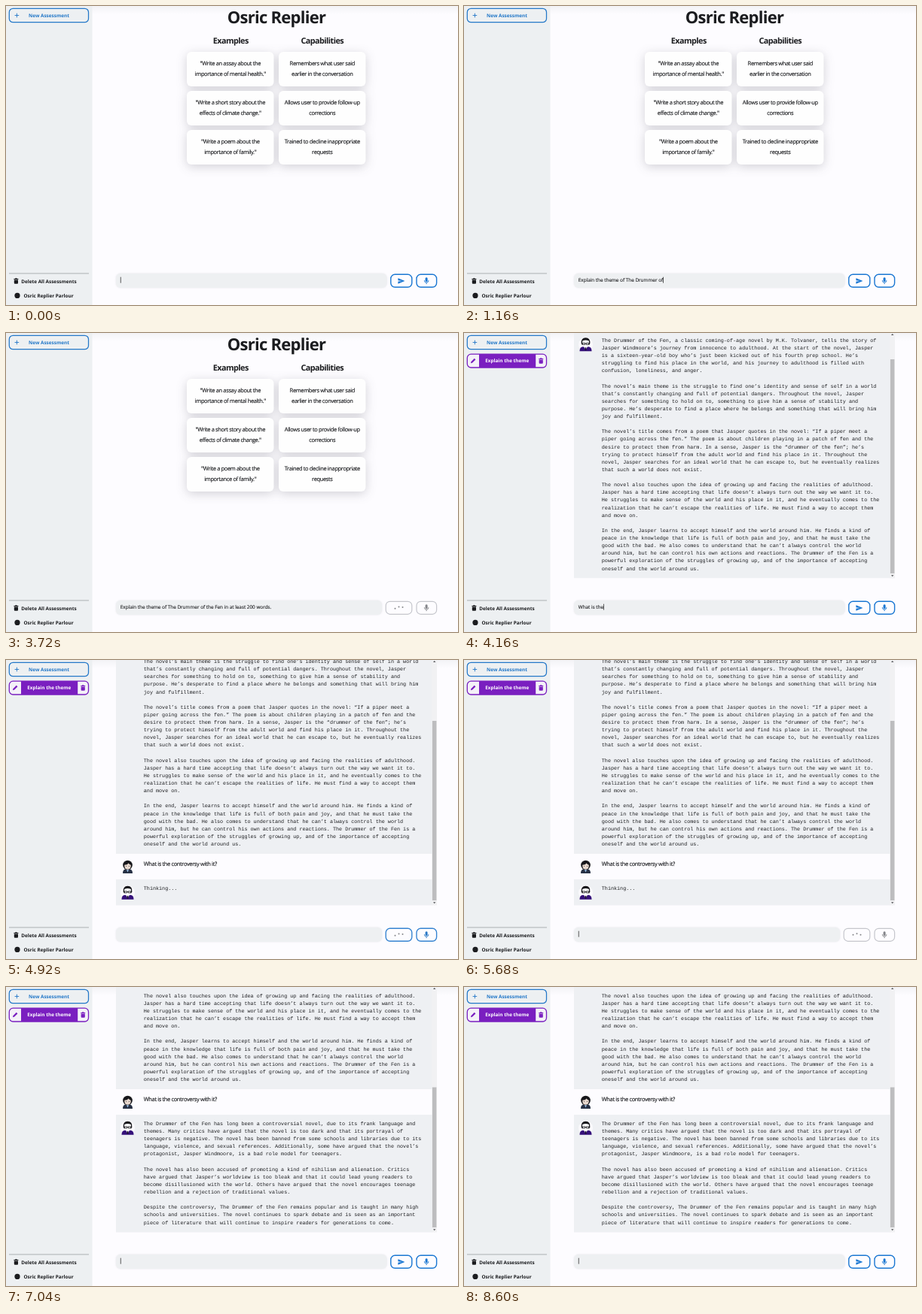
An HTML page that plays this animation: 600 px wide and 398 px high, repeating every 8.68 s.

```html
<!DOCTYPE html>
<html lang="en">
<head>
<meta charset="utf-8">
<title>Essay assistant</title>
<style>
  html, body { margin: 0; width: 100%; height: 100%; overflow: hidden; background: #fdfcff; }
  svg { display: block; width: 100vw; height: 100vh; }
  text { font-family: 'Open Sans', 'Noto Sans', sans-serif; fill: #1b1c1f; text-rendering: geometricPrecision; white-space: pre; }
  .mid { text-anchor: middle; }
  .title { font-size: 22px; font-weight: 700; letter-spacing: -.75px; }
  .head { font-size: 10.8px; font-weight: 700; letter-spacing: -.55px; }
  .body { font-size: 7.5px; letter-spacing: -.37px; stroke: #1b1c1f; stroke-width: .14px; }
  .side { font-size: 6.4px; font-weight: 700; }
  .typed { font-size: 6.37px; stroke: #1b1c1f; stroke-width: .12px; }
  .mono { font: 6.76px 'Liberation Mono', monospace; }
  #cards { fill: #fefefe; filter: drop-shadow(0 3px 7px rgba(40, 42, 55, .2)); }
  .blue { fill: none; stroke: #2478c8; stroke-width: 1.25; }
  .purple { fill: none; stroke: #7a1fc0; stroke-width: 1.3; }
  .row { fill: #eef0f3; }
</style>
</head>
<body>
<svg viewBox="0 0 600 398" preserveAspectRatio="none">
  <defs>
    <clipPath id="view"><rect x="146" width="420" height="326.5"/></clipPath>
    <linearGradient id="topShade" x2="0" y2="1">
      <stop stop-color="#f3f3f6"/>
      <stop offset="1" stop-color="#fdfcff"/>
    </linearGradient>
    <g id="bin">
      <path d="M-3-3.2h6v1.1h-6zM-1.2-4h2.4v1h-2.4zM-2.6-1.6h5.2V2.6q0 1-1 1h-3.2q-1 0-1-1z"/>
    </g>
    <g id="student">
      <path d="M-6.5 9q0-5.5 4-5.5h5q4 0 4 5.5z" fill="#263044"/>
      <path d="M-2 3h4L0 7.5z" fill="#9fc4ea"/>
      <circle cy="-2" r="6.3" fill="#17171b"/>
      <path d="M-4.2-2.2q4 0 5.4-2.3 1 2 3 2.3v1.6q-.5 4.4-4.2 4.4T-4.2-.6z" fill="#e9d9cf"/>
      <path d="M-2.4-.5h1M1.4-.5h1" stroke="#333" stroke-width=".8"/>
    </g>
    <g id="tutor">
      <circle r="9.5" fill="#fbfafd"/>
      <path d="M-8 9.3q0-6 4.5-6h7q4.5 0 4.5 6z" fill="#35107a"/>
      <path d="M-2.4 3h4.8L0 8z" fill="#fff"/>
      <path d="M-.7 4h1.4l.5 3.5L0 8.5l-1.2-1z" fill="#1b1230"/>
      <path d="M-5.8-1q-.6-7.8 5.8-7.8T5.8-1L4.6 1h-9.2z" fill="#17171b"/>
      <path d="M-4.4-4.6q4.4-2 8.8 0v4Q3.8 4.2 0 4.2T-4.4-.6z" fill="#fafafa"/>
      <path d="M-4-1.6h3.2v2H-4zM.8-1.6H4v2H.8zM-.8-.9h1.6" fill="none" stroke="#17171b" stroke-width=".8"/>
    </g>
  </defs>

  <rect width="600" height="398" fill="#fdfcff"/>
  <rect width="600" height="11" fill="url(#topShade)"/>

  <g id="welcome">
    <text class="mid title" x="359" y="23.3">Osric Replier</text>
    <text class="mid head" x="298.3" y="49.9">Examples</text>
    <text class="mid head" x="419.8" y="49.9">Capabilities</text>
    <g id="cards"></g>
  </g>

  <g id="chat">
    <g clip-path="url(#view)">
      <g id="thread">
        <rect class="row" x="146" y="-328.5" width="420" height="328.5"/>
        <use href="#tutor" x="161.5" y="-311.5"/>
        <g id="essay"></g>
        <use href="#student" x="161.5" y="17"/>
        <text class="body" x="182.8" y="16.4">What is the controversy with it?</text>
        <rect class="row" x="146" y="34" width="420" height="300"/>
        <use href="#tutor" x="161.5" y="51.5"/>
        <text id="thinking" class="mono" x="182.8" y="48">Thinking...</text>
        <g id="reply"></g>
      </g>
    </g>
    <rect x="565.5" width="6.5" height="326.5" fill="#f1f1f3"/>
    <rect id="thumb" x="565.9" width="5.5" fill="#bdbdbf"/>
    <path d="M567 3h3.4l-1.7-2zM567 322.2h3.4l-1.7 2z" fill="#55565a"/>
  </g>

  <rect width="114.5" height="398" fill="#edf0f2"/>
  <rect class="blue" x="4.3" y="3.3" width="105.2" height="18.4" rx="5"/>
  <path class="blue" d="M11.6 12.5h5.6M14.4 9.7v5.6" style="stroke-width:.9"/>
  <text class="mid side" x="57" y="14.8" style="fill:#2478c8">New Assessment</text>
  <g id="topic">
    <rect x="4.3" y="28.2" width="105.2" height="17.8" rx="5" fill="#f4f1f8"/>
    <rect x="20" y="28" width="75.2" height="18" fill="#7a1fc0"/>
    <rect class="purple" x="4.3" y="28.2" width="105.2" height="17.8" rx="5"/>
    <path d="M9 40.2l.4-2 4.4-4.4 1.6 1.6-4.4 4.4z" fill="#7a1fc0"/>
    <use href="#bin" x="102.2" y="37.2" fill="#7a1fc0"/>
    <text class="mid side" x="57.3" y="39.4" style="fill:#fff">Explain the theme</text>
  </g>
  <path d="M4 356h106" stroke="#8f9296" stroke-width=".7"/>
  <use href="#bin" x="13.4" y="366.2" fill="#1b1c1f"/>
  <text class="side" x="20.2" y="368.6">Delete All Assessments</text>
  <circle cx="15" cy="385.4" r="3.6" fill="#1b1c1f"/>
  <text class="side" x="23.5" y="387.8">Osric Replier Parlour</text>

  <rect id="field" x="146" y="356" height="19" rx="6" fill="#eef0f2" style="filter:drop-shadow(0 0 1px rgba(60,60,80,.12))"/>
  <text id="typed" class="typed" x="151.8" y="367.4"></text>
  <rect id="caret" y="360.7" width=".8" height="8" fill="#333"/>
  <rect id="sendBox" y="357.3" height="17" rx="5.5" fill="none"/>
  <rect id="micBox" x="545" y="357.3" width="26.6" height="17" rx="5.5" fill="none"/>
  <path id="plane" d="M520.4 362.3l9 3.7-9 3.7v-2.9l5.6-.8-5.6-.8z" fill="#1976d2"/>
  <g id="dots" fill="#85868a"></g>
  <g id="mic">
    <rect x="556.6" y="361.2" width="3" height="5.8" rx="1.5" stroke="none"/>
    <path d="M555.3 365.2q0 3 2.8 3t2.8-3M558.1 368.2v2" fill="none" stroke-width=".9"/>
  </g>
</svg>

<script>
const LOOP = 8680, KEY_MS = 32, FADE_MS = 130;
const FIRST = { text: 'Explain the theme of The Drummer of the Fen in at least 200 words.', type: 40, send: 2200, answer: 3760 };
const SECOND = { text: 'What is the controversy with it?', type: 3800, send: 4900, answer: 6120 };

const essayText = `The Drummer of the Fen, a classic coming-of-age novel by M.K. Tolvaner, tells the story of
Jasper Windmoore’s journey from innocence to adulthood. At the start of the novel, Jasper
is a sixteen-year-old boy who’s just been kicked out of his fourth prep school. He’s
struggling to find his place in the world, and his journey to adulthood is filled with
confusion, loneliness, and anger.

The novel’s main theme is the struggle to find one’s identity and sense of self in a world
that’s constantly changing and full of potential dangers. Throughout the novel, Jasper
searches for something to hold on to, something to give him a sense of stability and
purpose. He’s desperate to find a place where he belongs and something that will bring him
joy and fulfillment.

The novel’s title comes from a poem that Jasper quotes in the novel: “If a piper meet a
piper going across the fen.” The poem is about children playing in a patch of fen and the
desire to protect them from harm. In a sense, Jasper is the “drummer of the fen”; he’s
trying to protect himself from the adult world and find his place in it. Throughout the
novel, Jasper searches for an ideal world that he can escape to, but he eventually realizes
that such a world does not exist.

The novel also touches upon the idea of growing up and facing the realities of adulthood.
Jasper has a hard time accepting that life doesn’t always turn out the way we want it to.
He struggles to make sense of the world and his place in it, and he eventually comes to the
realization that he can’t escape the realities of life. He must find a way to accept them
and move on.

In the end, Jasper learns to accept himself and the world around him. He finds a kind of
peace in the knowledge that life is full of both pain and joy, and that he must take the
good with the bad. He also comes to understand that he can’t always control the world
around him, but he can control his own actions and reactions. The Drummer of the Fen is a
powerful exploration of the struggles of growing up, and of the importance of accepting
oneself and the world around us.`;

const replyText = `The Drummer of the Fen has long been a controversial novel, due to its frank language and
themes. Many critics have argued that the novel is too dark and that its portrayal of
teenagers is negative. The novel has been banned from some schools and libraries due to its
language, violence, and sexual references. Additionally, some have argued that the novel’s
protagonist, Jasper Windmoore, is a bad role model for teenagers.

The novel has also been accused of promoting a kind of nihilism and alienation. Critics
have argued that Jasper’s worldview is too bleak and that it could lead young readers to
become disillusioned with the world. Others have argued that the novel encourages teenage
rebellion and a rejection of traditional values.

Despite the controversy, The Drummer of the Fen remains popular and is taught in many high
schools and universities. The novel continues to spark debate and is seen as an important
piece of literature that will continue to inspire readers for generations to come.`;

const cards = [
  ['"Write an assay about the', 'importance of mental health."'],
  ['"Write a short story about the', 'effects of climate change."'],
  ['"Write a poem about the', 'importance of family."'],
  ['Remembers what user said', 'earlier in the conversation'],
  ['Allows user to provide follow-up', 'corrections'],
  ['Trained to decline inappropriate', 'requests'],
];

const $ = id => document.getElementById(id);
const show = (id, on) => { $(id).style.display = on ? '' : 'none'; };

function add(parent, tag, attrs, text = '') {
  const el = document.createElementNS('http://www.w3.org/2000/svg', tag);
  for (const key in attrs) el.setAttribute(key, attrs[key]);
  el.textContent = text;
  return parent.appendChild(el);
}

function addLines(id, text, firstBaseline) {
  text.split('\n').forEach((line, i) =>
    add($(id), 'text', { class: 'mono', x: 182.8, y: firstBaseline + i * 10.12 }, line));
}

cards.forEach((lines, i) => {
  const x = i < 3 ? 240 : 362, y = 61 + (i % 3) * 52;
  add($('cards'), 'rect', { x, y, width: 115.5, height: 46, rx: 6 });
  lines.forEach((line, j) =>
    add($('welcome'), 'text', { class: 'mid body', x: x + 57.8, y: y + 18.2 + j * 13.5 }, line));
});
addLines('essay', essayText, -314.6);
addLines('reply', replyText, 48);
const dots = [0, 1, 2].map(i => add($('dots'), 'circle', { cx: 516.5 + i * 5, r: 1 }));

const clamp = v => Math.min(1, Math.max(0, v));
const mix = (a, b, k) => `rgb(${a.map((v, i) => Math.round(v + (b[i] - v) * k))})`;
const BLUE = [25, 118, 210], GREY_LINE = [197, 198, 204], GREY_ICON = [132, 133, 138];

function render(t) {
  const turn = t < FIRST.answer ? FIRST : SECOND;
  const chatting = turn === SECOND;
  const busy = t >= turn.send && t < turn.answer;
  const answered = t >= SECOND.answer;

  show('welcome', !chatting);
  show('chat', chatting);
  show('topic', chatting);
  show('thinking', !answered);
  show('reply', answered);
  const [rowEnd, thumbTop] = answered ? [136, 133.5] : t >= SECOND.send ? [258, 81] : [326.5, 35];
  $('thread').setAttribute('transform', `translate(0 ${rowEnd})`);
  $('thumb').setAttribute('y', thumbTop);
  $('thumb').setAttribute('height', 320 - thumbTop);

  const count = Math.floor(clamp((t - turn.type) / (turn.text.length * KEY_MS)) * turn.text.length);
  const cleared = chatting && t >= turn.send;
  const typed = cleared ? '' : turn.text.slice(0, count);
  $('typed').textContent = typed;
  const typing = typed && count < turn.text.length;
  const blinkOn = (t + 120) % 320 < 160;
  show('caret', (typing || blinkOn) && !(busy && !chatting));
  $('caret').setAttribute('x', 151.8 + (typed ? $('typed').getComputedTextLength() : 0));

  // Buttons fade to grey while waiting and back once the answer is in.
  const off = [FIRST, SECOND].reduce((sum, { send, answer }) =>
    sum + clamp((t - send) / FADE_MS) - clamp((t - answer) / FADE_MS), 0);
  const line = mix(BLUE, GREY_LINE, off), icon = mix(BLUE, GREY_ICON, off);
  $('field').setAttribute('width', busy ? 353 : 359.5);
  $('sendBox').setAttribute('x', busy ? 504.2 : 510.8);
  $('sendBox').setAttribute('width', busy ? 34.6 : 28);
  for (const id of ['sendBox', 'micBox']) {
    $(id).style.stroke = line;
    $(id).style.strokeWidth = 1.4 - .2 * off;
  }
  $('mic').style.fill = $('mic').style.stroke = icon;
  show('plane', !busy);
  show('dots', busy);
  dots.forEach((dot, i) => {
    const phase = t / 400 + .05 - i / 4;
    dot.setAttribute('cy', 365.8 - 1.5 * Math.cos(2 * Math.PI * phase));
  });
}

const start = performance.now();
function tick() {
  render((performance.now() - start) % LOOP);
  requestAnimationFrame(tick);
}
tick();
</script>
</body>
</html>
```
